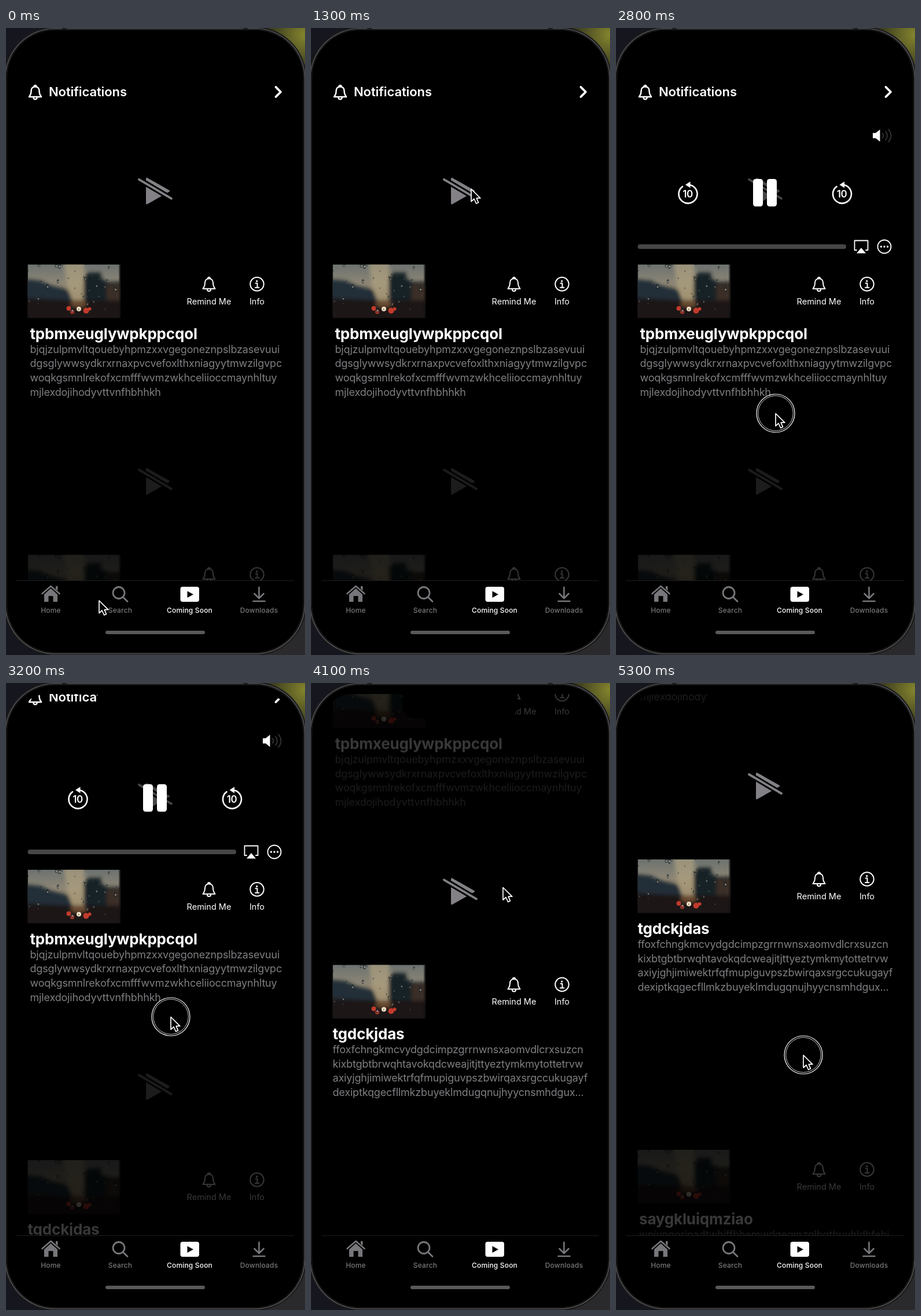
Animation, 517 px wide and 1084 px high, one loop 5.4 s. Source, as an HTML page:

```html
<!DOCTYPE html>
<html lang="en">
<head>
<meta charset="utf-8">
<title>Coming Soon</title>
<style>
  html, body { margin: 0; width: 100%; height: 100%; overflow: hidden; background: #000; }
  svg { display: block; width: 100vw; height: 100vh; }
  text { font-family: Inter, Roboto, sans-serif; font-optical-sizing: none; fill: #fff; }
  .head { font-size: 22px; font-weight: 600; letter-spacing: -.1px; }
  .title { font-size: 26px; font-weight: 700; letter-spacing: -.18px; }
  .body { font-size: 18px; letter-spacing: -.17px; fill: #7f7e82; }
  .label { font-size: 14.5px; text-anchor: middle; }
  .tab { font-size: 12px; font-weight: 500; letter-spacing: .18px; text-anchor: middle; }
  .ten { font-size: 17px; font-weight: 600; letter-spacing: -.5px; text-anchor: middle; }
  .line { fill: none; stroke: #fff; stroke-linecap: round; stroke-linejoin: round; }
</style>
</head>
<body>
<svg id="stage" viewBox="0 0 517 1084" preserveAspectRatio="none"></svg>
<script>
const LOOP = 5400;
const PITCH = 502;
const DIM = 0.22;

const items = [
  { x: 41.5, play: true, title: 'tpbmxeuglywpkppcqol', lines: [
    'bjqjzulpmvltqouebyhpmzxxvgegoneznpslbzasevuui',
    'dgsglywwsydkrxrnaxpvcvefoxlthxniagyytmwzilgvpc',
    'woqkgsmnlrekofxcmfffwvmzwkhceliioccmaynhltuy',
    'mjlexdojihodyvttvnfhbhhkh'] },
  { x: 37.5, play: true, title: 'tgdckjdas', lines: [
    'ffoxfchngkmcvydgdcimpzgrrnwnsxaomvdlcrxsuzcn',
    'kixbtgbtbrwqhtavokqdcweajitjttyeztymkmytottetrvw',
    'axiyjghjimiwektrfqfmupiguvpszbwirqaxsrgccukugayf',
    'dexiptkqgecfllmkzbuyeklmdugqnujhyycnsmhdgux...'] },
  { x: 40, play: false, title: 'saygkluiqmziao', lines: [
    'wnjypgorjpadtwhjffbhemwdgegmzglbgtbuyhldhfehj'] }
];

function random(seed) {
  return () => (seed = (seed * 16807) % 2147483647) / 2147483647;
}

const at = (x, y, inner, attrs = '') => `<g transform="translate(${x} ${y})" ${attrs}>${inner}</g>`;
const text = (cls, x, y, str, attrs = '') => `<text class="${cls}" x="${x}" y="${y}" ${attrs}>${str}</text>`;

function drops() {
  const rnd = random(77);
  let out = '';
  for (let i = 0; i < 44; i++) {
    const x = rnd() * 156, y = rnd() * 80, r = 0.8 + rnd() ** 2 * 2;
    out += at(x.toFixed(1), y.toFixed(1),
      `<ellipse rx="${r.toFixed(1)}" ry="${(r * 1.8).toFixed(1)}" fill="#20272a"/>` +
      `<circle cx=".5" cy="1" r="${(r * 0.55).toFixed(1)}" fill="#bdbaab"/>`,
      'opacity=".65"');
  }
  return out;
}

const defs = `<defs>
  <clipPath id="screen"><path d="M18 956V73a54 54 0 0 1 54-54H444a54 54 0 0 1 54 54V956Z"/></clipPath>
  <clipPath id="frame"><rect width="160" height="92.5"/></clipPath>
  <filter id="soft" x="-20%" y="-20%" width="140%" height="140%"><feGaussianBlur stdDeviation="3"/></filter>
  <linearGradient id="sky" x2="0" y2="1">
    <stop stop-color="#6c7270"/><stop offset=".35" stop-color="#8d8675"/>
    <stop offset=".65" stop-color="#7d6b52"/><stop offset="1" stop-color="#1c1715"/>
  </linearGradient>
  <radialGradient id="glow" cx="517" cy="12" r="75" gradientUnits="userSpaceOnUse">
    <stop stop-color="#85852e"/><stop offset="1" stop-color="#25271b"/>
  </radialGradient>
  <g id="photo" clip-path="url(#frame)">
    <rect width="160" height="92.5" fill="url(#sky)"/>
    <g filter="url(#soft)">
      <path d="M62-4H98V62H72Z" fill="#b3a482" opacity=".65"/>
      <path d="M-8 25L22 28 42 37 70 44 78 64-8 68Z" fill="#222e37"/>
      <path d="M97 24L104 14H127V24L138 30H168V76H97Z" fill="#192227"/>
      <path d="M136 34H168V68H136Z" fill="#3a2f26"/>
      <path d="M-8 58L74 62H168V100H-8Z" fill="#1d1715"/>
      <ellipse cx="88" cy="68" rx="14" ry="6" fill="#6a4c32"/>
    </g>
    <g fill="#c23a2c"><circle cx="71" cy="76" r="4"/><circle cx="77" cy="82" r="3.5"/>
      <circle cx="101" cy="80" r="5"/><circle cx="107" cy="77" r="3"/></g>
    <circle cx="88.500" cy="77" r="4" fill="#f0dfc4"/>
    ${drops()}
    <rect x="157.5" width="2.5" height="92.5" fill="#111" opacity=".55"/>
  </g>
  <g id="bell" class="line">
    <path d="M-10.5 8C-9 4.5-7 5-7-2C-7-6.800-4-9.500 0-9.500S7-6.800 7-2C7 5 9 4.500 10.500 8Z"/>
    <path d="M-2-9.500a2 2.200 0 0 1 4 0M-3 9.500a3 2.800 0 0 0 6 0"/>
  </g>
  <g id="info">
    <circle class="line" r="11.7" stroke-width="2"/>
    <circle cx="-.3" cy="-5.2" r="1.7" fill="#fff"/>
    <path class="line" d="M-2.500-1.500H.5V6M-3 6H3.500" stroke-width="2"/>
  </g>
  <g id="noplay" stroke-linecap="round" stroke-linejoin="round">
    <path d="M-14.500-21.500V21.500L23.500 0Z" fill="#838186" stroke="#838186" stroke-width="3"/>
    <path d="M-28-20L28 13" stroke="#000" stroke-width="9.500"/>
    <path d="M-28-20L28 13" stroke="#838186" stroke-width="3.800"/>
  </g>
  <g id="skip">
    <path class="line" d="M0-16A16 16 0 1 1-9.500-12.900" stroke-width="2.600"/>
    <path d="M-4.500-16L4-21.500V-10.500Z" fill="#fff"/>
    ${text('ten', -0.5, 6.2, '10')}
  </g>
</defs>`;

// Item coordinates start at the top left of the thumbnail row.
function item({ x, play, title, lines }, i) {
  return at(0, 408.8 + i * PITCH,
    (play ? '<use href="#noplay" x="258" y="-127"/>' : '') +
    '<use href="#photo" x="37.5"/>' +
    '<use href="#bell" x="351" y="34" stroke-width="2"/>' + text('label', 351, 69, 'Remind Me') +
    '<use href="#info" x="434" y="34"/>' + text('label', 434, 69, 'Info') +
    text('title', x, 129, title) +
    lines.map((s, n) => text('body', x, 153 + n * 24.6, s)).join(''),
    `id="item${i}"`);
}

const header =
  '<use href="#bell" x="50.5" y="111" stroke-width="2.5"/>' +
  text('head', 74, 118, 'Notifications') +
  '<path class="line" d="M466.500 102L475 110.500L466.500 119" stroke-width="3.800"/>';

const controls = `<g id="controls">
  <rect x="37" y="155" width="441" height="248" opacity=".48"/>
  <path d="M444 181.500h5l7.500-6v21l-7.500-6h-5Z" fill="#fff"/>
  <g class="line" style="stroke:#363636" stroke-width="1.800">
    <path d="M461 182q3 4 0 8M466 178.500q6 7.500 0 15M471 175q9 11 0 22"/></g>
  <use href="#skip" x="124.500" y="287"/><use href="#skip" x="391" y="287"/>
  <rect x="237" y="261" width="17" height="47.500" rx="4.500" fill="#fff"/>
  <rect x="261" y="261" width="17" height="47.500" rx="4.500" fill="#fff"/>
  <rect x="37.500" y="374" width="360.500" height="8" rx="4" fill="#464646"/>
  <path class="line" d="M416 384H412.500V367.500H435.500V384H432" stroke-width="1.800"/>
  <path d="M424 380L432 389.500H416Z" fill="#fff"/>
  <circle class="line" cx="464" cy="378" r="11.500" stroke-width="1.800"/>
  <g fill="#fff"><circle cx="458.500" cy="378" r="1.700"/><circle cx="464" cy="378" r="1.700"/><circle cx="469.500" cy="378" r="1.700"/></g>
</g>`;

const GRAY = '#77767a';
const tabs = [
  ['Home', GRAY, `<path d="M-11.500 0L0-10.500L11.500 0V13H4V3H-4V13H-11.500Z" fill="${GRAY}"/>
    <path d="M8.500-14H12V-6L8.500-9Z" fill="${GRAY}"/>
    <path d="M-15 0L0-13.500L15 0" fill="none" stroke="#000" stroke-width="5"/>
    <path d="M-15-1L0-14L15-1" fill="none" stroke="${GRAY}" stroke-width="2.600" stroke-linecap="round" stroke-linejoin="round"/>`],
  ['Search', GRAY, `<g class="line" style="stroke:${GRAY}" stroke-width="2.800"><circle cx="-2.500" cy="-2.500" r="10"/><path d="M5 5L12.500 12.500"/></g>`],
  ['Coming Soon', '#fff', '<rect x="-16" y="-13" width="32.500" height="26" rx="4" fill="#fff"/><path d="M-4-5.500V6L6.500 .2Z"/>'],
  ['Downloads', GRAY, `<path class="line" style="stroke:${GRAY}" d="M0-12V7M-8-1L0 7L8-1M-10 12H10" stroke-width="2.600"/>`]
];
const tabBar = '<path d="M18 955.500H498" stroke="#1d1d1d"/>' +
  tabs.map(([name, color, icon], i) =>
    at(77.5 + i * 120, 979, icon + text('tab', 0, 32.3, name, `style="fill:${color}"`))).join('') +
  '<rect x="172" y="1042" width="172" height="6" rx="3" fill="#59595a"/>';

const phone = `
  <rect width="517" height="1084" fill="#15161e"/>
  <path d="M420 0H517V95Z" fill="url(#glow)"/>
  <path d="M420 1084H517V990Z" fill="#2a2a2c"/>
  <rect x="-4" y="-2" width="523.500" height="1087" rx="89" fill="#1b1b1c"/>
  <rect x="-1" y="1" width="517.500" height="1081" rx="86" fill="#000" stroke="#525254" stroke-width="1.600"/>
  <rect x="1" y="3" width="513.500" height="1077" rx="84" fill="none" stroke="#161617" stroke-width="2"/>
  <path d="M97 1H105M410 1H418" stroke="#1c1c1d" stroke-width="2.500"/>`;

const notch = '<path d="M158 18V39a22 22 0 0 0 22 22H335a22 22 0 0 0 22-22V18Z"/>';

const pointer = `<g id="pointer">
  <g id="touch" fill="none" stroke="#fff"><circle r="33" stroke-width="1.200"/><circle r="30.300" stroke-width=".8"/></g>
  <path d="M0 .5V22L5 17.500L8.700 25.500L12.500 23.800L9.200 16.200H15.800Z" stroke="#fff" stroke-width="1.700" stroke-linejoin="round"/>
</g>`;

const stage = document.getElementById('stage');
stage.innerHTML = defs + phone +
  `<g clip-path="url(#screen)"><g id="list">${header}${items.map(item).join('')}${controls}</g></g>` +
  notch + tabBar + pointer;

const el = id => document.getElementById(id);
const [list, ctrl, arrow, ring] = ['list', 'controls', 'pointer', 'touch'].map(el);
const rows = items.map((_, i) => el('item' + i));

// Keys are [time, value, value, ...]; values blend linearly.
function track(keys, t) {
  let i = keys.findIndex(k => k[0] > t);
  if (i < 0) return keys[keys.length - 1].slice(1);
  i = Math.max(i, 1);
  const a = keys[i - 1], b = keys[i];
  const k = Math.max(0, (t - a[0]) / (b[0] - a[0]));
  return a.slice(1).map((v, n) => v + (b[n + 1] - v) * k);
}

const scroll = [[2800, 0], [3000, 33], [3200, 86], [3400, 148], [3600, 198], [3800, 304],
  [3900, 350], [4100, 423.5], [4300, 500], [4700, 571], [4900, 587], [5000, 595], [5300, 605.8]];
const path = [[100, 161, 989.5], [400, 178, 905], [700, 225, 610], [1000, 267, 335], [1200, 277, 278],
  [1800, 277, 278], [2000, 277, 400], [2300, 276, 677], [2600, 276, 677], [2800, 276, 666],
  [3000, 279, 633], [3200, 285, 577], [3400, 299, 515], [3600, 315, 465], [3800, 332, 353],
  [4100, 332, 353], [4300, 332, 410], [4700, 331.5, 543], [5000, 328, 610], [5200, 324, 643]];
const shown = [[1400, 0], [1700, 1], [3600, 1], [3800, 0]];
const focus = [[3600, 0], [3900, 1]];
const presses = [[1500, 1700], [2400, 3800], [5200, LOOP]];
const lateSteps = [3400, 3600, 3800, 3900, 4100, 4300, 4700, 4900, 5000, 5200, 5300];

function step(t) {
  return t < 3400 ? Math.floor(t / 100) * 100 : lateSteps.filter(s => s <= t).pop();
}

function draw(time) {
  const t = step(time % LOOP);
  const [y] = track(scroll, t);
  const [px, py] = track(path, t);
  const [f] = track(focus, t);
  list.setAttribute('transform', `translate(0 ${-y})`);
  arrow.setAttribute('transform', `translate(${px} ${py})`);
  ctrl.setAttribute('opacity', track(shown, t)[0]);
  ring.setAttribute('visibility', presses.some(([a, b]) => t >= a && t < b) ? 'visible' : 'hidden');
  [1 - f, f, 0].forEach((k, i) => rows[i].setAttribute('opacity', DIM + (1 - DIM) * k));
}

const start = performance.now();
function tick() {
  draw(performance.now() - start);
  requestAnimationFrame(tick);
}
tick();
</script>
</body>
</html>
```
